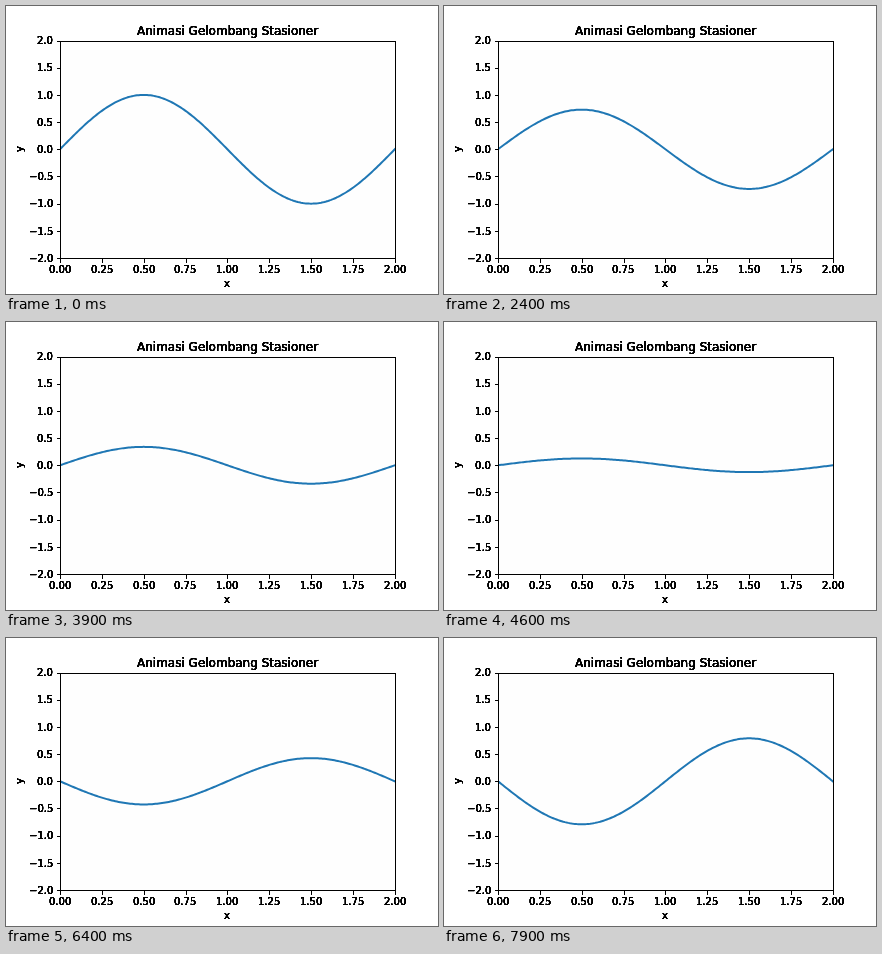
An HTML page with a canvas that plays this animation: 432 px wide and 288 px high, repeating every 8000 ms.

```html
<!DOCTYPE html>
<html lang="id">
<head>
<meta charset="utf-8">
<title>Animasi Gelombang Stasioner</title>
<style>
  html, body { margin: 0; width: 100%; height: 100%; overflow: hidden; background: #fff; }
  canvas { display: block; }
</style>
</head>
<body>
<canvas id="stage" width="432" height="288"></canvas>
<script>
const W = 432, H = 288;
const box = { left: 54, right: 388.8, top: 34.56, bottom: 252 };
const STEP = 100, STEPS = 80;

const toX = x => box.left + (box.right - box.left) * x / 2;
const toY = y => (box.top + box.bottom) / 2 - (box.bottom - box.top) * y / 4;
const snap = v => Math.floor(v + 0.5) + 0.5;

const ctx = document.getElementById('stage').getContext('2d');
const axes = document.createElement('canvas');
axes.width = W;
axes.height = H;

function label(c, text, size, x, baseline, align) {
  c.font = `${size}px "DejaVu Sans", sans-serif`;
  const left = x - c.measureText(text).width * align;
  c.fillText(text, Math.round(left), baseline);
}

function segment(c, x1, y1, x2, y2) {
  c.beginPath();
  c.moveTo(x1, y1);
  c.lineTo(x2, y2);
  c.stroke();
}

function drawAxes(c) {
  c.lineWidth = 0.8;
  const l = snap(box.left), r = snap(box.right);
  const t = snap(box.top), b = snap(box.bottom);
  c.strokeRect(l, t, r - l, b - t);

  for (let k = 0; k <= 8; k++) {
    const xv = k / 4, yv = k / 2 - 2;
    const x = snap(toX(xv)), y = snap(toY(yv));
    segment(c, x, b, x, b + 4);
    segment(c, l, y, l - 3, y);
    label(c, xv.toFixed(2), 10, toX(xv), 267, 0.5);
    label(c, yv.toFixed(1).replace('-', '\u2212'), 10, 47, Math.round(toY(yv) + 3.7), 1);
  }

  label(c, 'Animasi Gelombang Stasioner', 12, toX(1), 29, 0.5);
  label(c, 'x', 10, toX(1), 281, 0.5);
  c.save();
  c.translate(17, 143);
  c.rotate(-Math.PI / 2);
  label(c, 'y', 10, 0, 0, 0.5);
  c.restore();
}

// Repeated passes harden the antialiased edges of text and ticks.
for (let pass = 0; pass < 8; pass++) drawAxes(axes.getContext('2d'));

function drawWave(amp) {
  ctx.save();
  ctx.beginPath();
  ctx.rect(54, 35, 335, 217);
  ctx.clip();
  ctx.beginPath();
  for (let i = 0; i <= 200; i++) {
    const x = i / 100;
    ctx.lineTo(toX(x), toY(amp * Math.sin(Math.PI * x)));
  }
  ctx.strokeStyle = '#1f77b4';
  ctx.lineWidth = 2;
  ctx.lineJoin = 'round';
  ctx.lineCap = 'square';
  ctx.stroke();
  ctx.restore();
}

function render(step) {
  ctx.fillStyle = '#fff';
  ctx.fillRect(0, 0, W, H);
  ctx.fillStyle = '#fefefe';
  ctx.fillRect(54, 35, 335, 217);
  drawWave(Math.cos(Math.PI * step / 100));
  ctx.drawImage(axes, 0, 0);
}

let shown = -1;
function tick() {
  const step = Math.floor(performance.now() / STEP) % STEPS;
  if (step !== shown) render(shown = step);
  requestAnimationFrame(tick);
}
tick();
</script>
</body>
</html>
```
